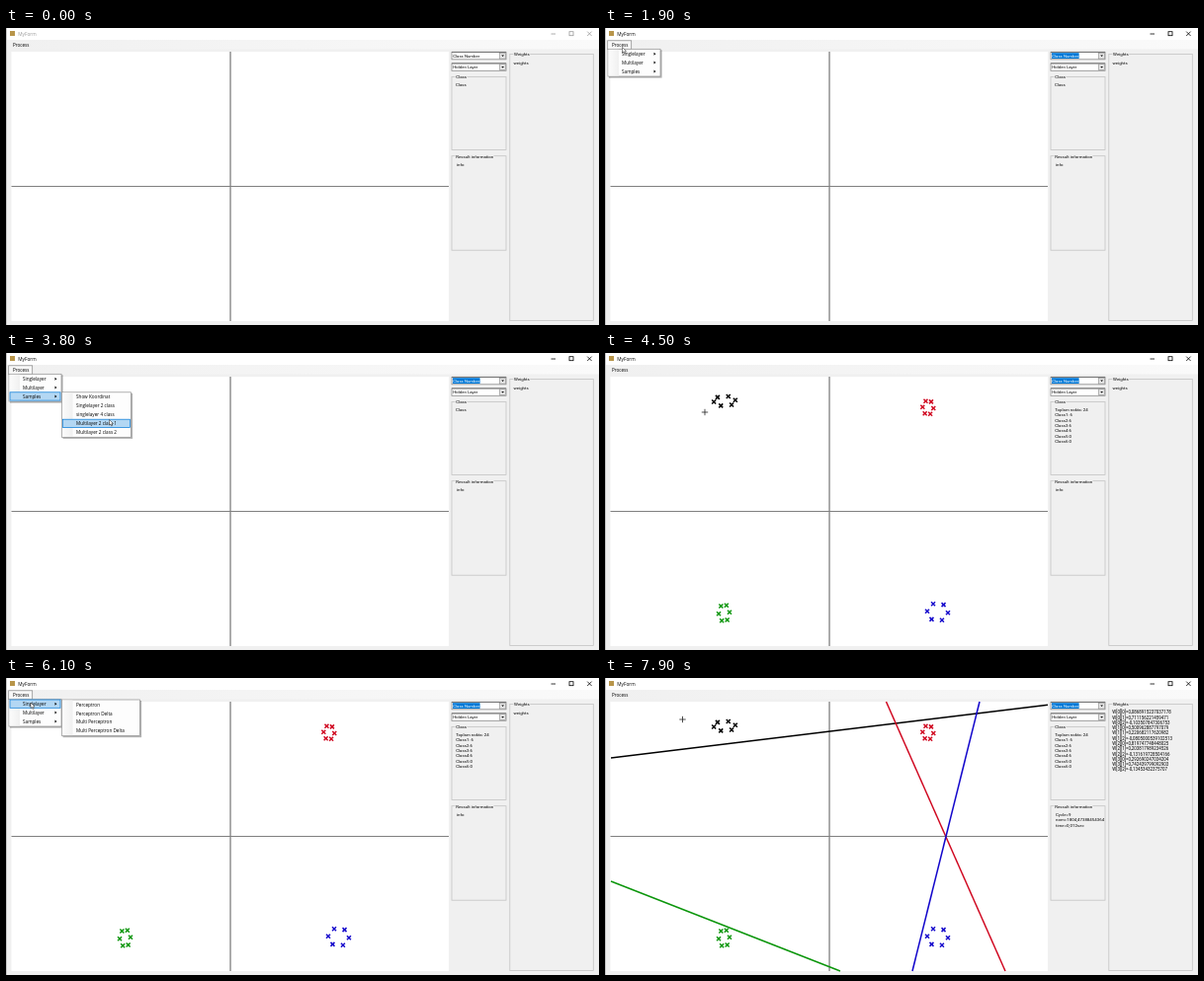
Animation, 600 px wide and 301 px high, one loop 8 s. Source, as an HTML page with a canvas:

```html
<!DOCTYPE html>
<html lang="en">
<head>
<meta charset="utf-8">
<title>MyForm</title>
<style>
html, body { margin: 0; width: 600px; height: 301px; overflow: hidden; background: #f0f0f0; }
canvas { display: block; }
</style>
</head>
<body>
<canvas id="stage" width="600" height="301"></canvas>
<script>
const ctx = document.getElementById('stage').getContext('2d');
const LOOP = 8000, STEP = 100, ROW = 8.9;
const UI = '"Open Sans", "Noto Sans", sans-serif';
const FORM = 'Roboto, "Liberation Sans", sans-serif';
const FACE = '#f0f0f0', HOT = '#b3d7f3', BLUE = '#0078d7', AXIS = '#808080';

const T = { active: 300, open1: 1400, sub1: 2900, points: 4400, open2: 5300, sub2: 6000, result: 7300 };

// each move: leaves at, arrives at, and where
const START = { x: 200, y: 216 };
const MOVES = [
  { from: 100, to: 900, x: 17.5, y: 19.5 },
  { from: 1900, to: 2600, x: 28.5, y: 41 },
  { from: 2900, to: 3600, x: 104.5, y: 67.5 },
  { from: 3800, to: 4100, x: 101, y: 60 },
  { from: 4500, to: 5100, x: 7.5, y: 15 },
  { from: 5300, to: 5700, x: 25, y: 25 },
  { from: 6200, to: 6700, x: 78.5, y: 42 }
];

const MAIN = { x: 3, y: 21.3, w: 53, text: 17, items: ['Singlelayer', 'Multilayer', 'Samples'], arrows: true };
const SINGLE = { x: 56.5, y: 22, w: 79, text: 71, parent: 0,
  items: ['Perceptron', 'Perceptron Delta', 'Multi Perceptron', 'Multi Perceptron Delta'] };
const SAMPLES = { x: 56.5, y: 39.8, w: 70, text: 71, parent: 2,
  items: ['Show Koordinat', 'Singlelayer 2 class', 'singlelayer 4 class', 'Multilayer 2 class 1', 'Multilayer 2 class 2'] };

// six marks on a ring per class, and the line that separates the class
const CLASSES = [
  { color: '#000', x: 121, y: 48.7, rx: 11, ry: 5, turn: 170, line: [6, 81, 448, 27.3] },
  { color: '#d00820', x: 326.8, y: 55.3, rx: 5.5, ry: 7.2, turn: -115, line: [284.5, 24, 405, 297] },
  { color: '#0c960c', x: 120.5, y: 263.5, rx: 5.5, ry: 8.5, turn: -125, line: [6, 206, 238, 297] },
  { color: '#1408cc', x: 336.5, y: 262.5, rx: 10.5, ry: 9, turn: -115, line: [379, 24, 311, 297] }
];

const COUNTS = ['Toplam nokta: 24', 'Class1: 6', 'Class2:6', 'Class3:6', 'Class4:6', 'Class5:0', 'Class6:0'];
const INFO = ['Cycle=9', 'nom=1804,47388454364', 'time=0,012sec'];
const WEIGHTS = ['0,0868915237037178', '0,711156221459471', '-0,103507847306753', '0,500962887797079',
  '0,220682117620982', '-0,0805000539102513', '0,819747748448025', '0,203817989234526',
  '-0,131619728504166', '0,292690247034204', '0,742439799092903', '-0,13453432375707'
].map((v, i) => `W[${Math.floor(i / 3)}][${i % 3}]=${v}`);

function rect(x, y, w, h, fill, stroke, lw = 0.7) {
  if (fill) { ctx.fillStyle = fill; ctx.fillRect(x, y, w, h); }
  if (stroke) { ctx.strokeStyle = stroke; ctx.lineWidth = lw; ctx.strokeRect(x, y, w, h); }
}

function line(x1, y1, x2, y2, color, lw) {
  ctx.strokeStyle = color;
  ctx.lineWidth = lw;
  ctx.beginPath();
  ctx.moveTo(x1, y1);
  ctx.lineTo(x2, y2);
  ctx.stroke();
}

function poly(points, fill, stroke, lw) {
  ctx.beginPath();
  points.forEach(([x, y]) => ctx.lineTo(x, y));
  ctx.closePath();
  if (fill) { ctx.fillStyle = fill; ctx.fill(); }
  if (stroke) { ctx.strokeStyle = stroke; ctx.lineWidth = lw; ctx.stroke(); }
}

function cross(x, y, r, color, lw, tilt) {
  const a = tilt ? r : 0;
  line(x - r, y - a, x + r, y + a, color, lw);
  line(x - a, y + r, x + a, y - r, color, lw);
}

// y is the middle of the line; drawn large and scaled down for exact widths
function text(s, x, y, font = FORM, size = 4.35, color = '#000') {
  ctx.save();
  ctx.translate(x, y + size * 0.36);
  ctx.scale(0.1, 0.1);
  ctx.font = `${size * 10}px ${font}`;
  ctx.fillStyle = color;
  ctx.fillText(s, 0, 0);
  ctx.restore();
}

function lines(list, x, y, gap, size) {
  list.forEach((s, i) => text(s, x, y + i * gap, FORM, size));
}

function group(title, x, y, w, h, titleWidth) {
  rect(x, y, w, h, null, '#c4c4c4', 0.8);
  rect(x + 3.5, y - 2, titleWidth, 4, FACE);
  text(title, x + 4.3, y + 0.4);
}

function combo(label, y, selected) {
  rect(451, y, 55, 7.4, '#fff', '#8a8a8a', 0.8);
  line(451, y, 506, y, '#666', 0.8);
  rect(499.5, y + 0.9, 6, 5.8, '#e6e6e6', '#888', 0.6);
  poly([[501.2, y + 3], [504, y + 3], [502.6, y + 4.6]], '#000');
  if (selected) rect(452, y + 0.8, 27.6, 5.8, BLUE);
  text(label, 452.2, y + 3.8, FORM, 4.3, selected ? '#fff' : '#000');
}

function titleBar(active) {
  const c = active ? '#000' : '#999';
  rect(0, 0, 600, 12, '#fff');
  rect(4, 3, 5, 5, '#b8954a');
  text('MyForm', 12.2, 5.9, UI, 4.8, c);
  line(551.5, 6, 556, 6, c, 0.8);
  rect(570, 3.7, 4, 4, null, c, 0.8);
  cross(590.4, 5.8, 2.2, c, 0.8, true);
}

function menuStrip(state) {
  const g = ctx.createLinearGradient(0, 0, 600, 0);
  g.addColorStop(0, FACE);
  g.addColorStop(1, '#fafafa');
  rect(0, 12, 600, 9.5, g);
  if (state === 'hover') rect(2.7, 12.8, 24, 8, HOT, BLUE);
  if (state === 'open') rect(2.7, 12.8, 24, 9, '#f7f7f7', '#888');
  text('Process', 7, 16.9, UI, 4.55);
}

function rowAt(menu, p) {
  const i = Math.floor((p.y - menu.y - 0.4) / ROW);
  const inside = p.x >= menu.x && p.x <= menu.x + menu.w && i >= 0 && i < menu.items.length;
  return inside ? i : -1;
}

function dropDown(menu, hot) {
  const { x, y, w, items } = menu, h = items.length * ROW + 1;
  rect(x + 1, y + 1, w + 0.6, h + 0.6, 'rgba(0,0,0,.3)');
  rect(x, y, w, h, '#fdfdfd', '#909090');
  const g = ctx.createLinearGradient(x, 0, x + 11, 0);
  g.addColorStop(0, '#fcfcfc');
  g.addColorStop(1, FACE);
  rect(x + 0.5, y + 0.5, 10.5, h - 1, g);
  items.forEach((s, i) => {
    const top = y + 0.4 + i * ROW, mid = top + ROW / 2;
    if (i === hot) rect(x + 1, top + 0.3, w - 2, ROW - 0.6, HOT, BLUE);
    text(s, menu.text, mid + 0.1, UI, 4.65);
    if (menu.arrows) poly([[49.5, mid - 1.5], [51.4, mid], [49.5, mid + 1.5]], '#000');
  });
}

function plot(t) {
  rect(5.5, 24, 442.5, 273, '#fff');
  rect(226.4, 24, 1.3, 273, AXIS);
  rect(5.5, 160, 442.5, 1, AXIS);
  if (t < T.points) return;
  for (const c of CLASSES) {
    for (let i = 0; i < 6; i++) {
      const a = (c.turn + i * 60) * Math.PI / 180;
      cross(c.x + c.rx * Math.cos(a), c.y + c.ry * Math.sin(a), 2, c.color, 1.5, true);
    }
    if (t >= T.result) line(...c.line, c.color, 1.5);
  }
}

function pointer(t) {
  let { x, y } = START;
  for (const m of MOVES) {
    const u = Math.min(1, Math.max(0, (t - m.from) / (m.to - m.from)));
    const k = u * u * (3 - 2 * u);
    x += (m.x - x) * k;
    y += (m.y - y) * k;
  }
  return { x, y };
}

function arrow(x, y) {
  const shape = [[0, 0], [0, 5.6], [1.3, 4.5], [2.2, 6.5], [3.1, 6.1], [2.3, 4.2], [4, 4]];
  poly(shape.map(([a, b]) => [x + a, y + b]), '#fff', '#222', 0.5);
}

function draw(t) {
  const p = pointer(t);
  const first = t >= T.open1 && t < T.points;
  const open = first || (t >= T.open2 && t < T.result);
  const sub = first ? (t >= T.sub1 && SAMPLES) : (open && t >= T.sub2 && SINGLE);
  const onProcess = p.x > 2 && p.x < 27 && p.y > 12 && p.y < 21;
  const active = t >= T.active;

  rect(0, 0, 600, 301, FACE);
  titleBar(active);
  menuStrip(open ? 'open' : onProcess ? 'hover' : '');
  rect(0, 0, 1, 301, '#c8c8c8');
  plot(t);

  combo('Class Number', 24.4, active);
  combo('Hidden Layer', 35.9, false);
  group('Class', 451, 49.5, 55, 74, 12);
  group('Ressult information', 451, 129.7, 55, 95.5, 39);
  group('Weights', 509.8, 26.5, 84.5, 270, 17);
  if (t < T.points) text('Class', 455, 57.7);
  else lines(COUNTS, 455.2, 57.5, 5.33);
  if (t < T.result) {
    text('info', 456, 138);
    text('weights', 513.5, 35);
  } else {
    lines(INFO, 456, 138.3, 5.35, 4.4);
    lines(WEIGHTS, 513.3, 34.8, 5.27, 4.45);
  }

  if (open) {
    dropDown(MAIN, sub ? sub.parent : rowAt(MAIN, p));
    if (sub) dropDown(sub, rowAt(sub, p));
  }
  if (t <= MOVES[0].from) return;
  if (!open && p.y > 24) cross(p.x, p.y, 3.2, '#222', 0.8, false);
  else arrow(p.x, p.y);
}

function tick(now) {
  draw(Math.floor(now % LOOP / STEP) * STEP);
  requestAnimationFrame(tick);
}
draw(0);
requestAnimationFrame(tick);
</script>
</body>
</html>
```
